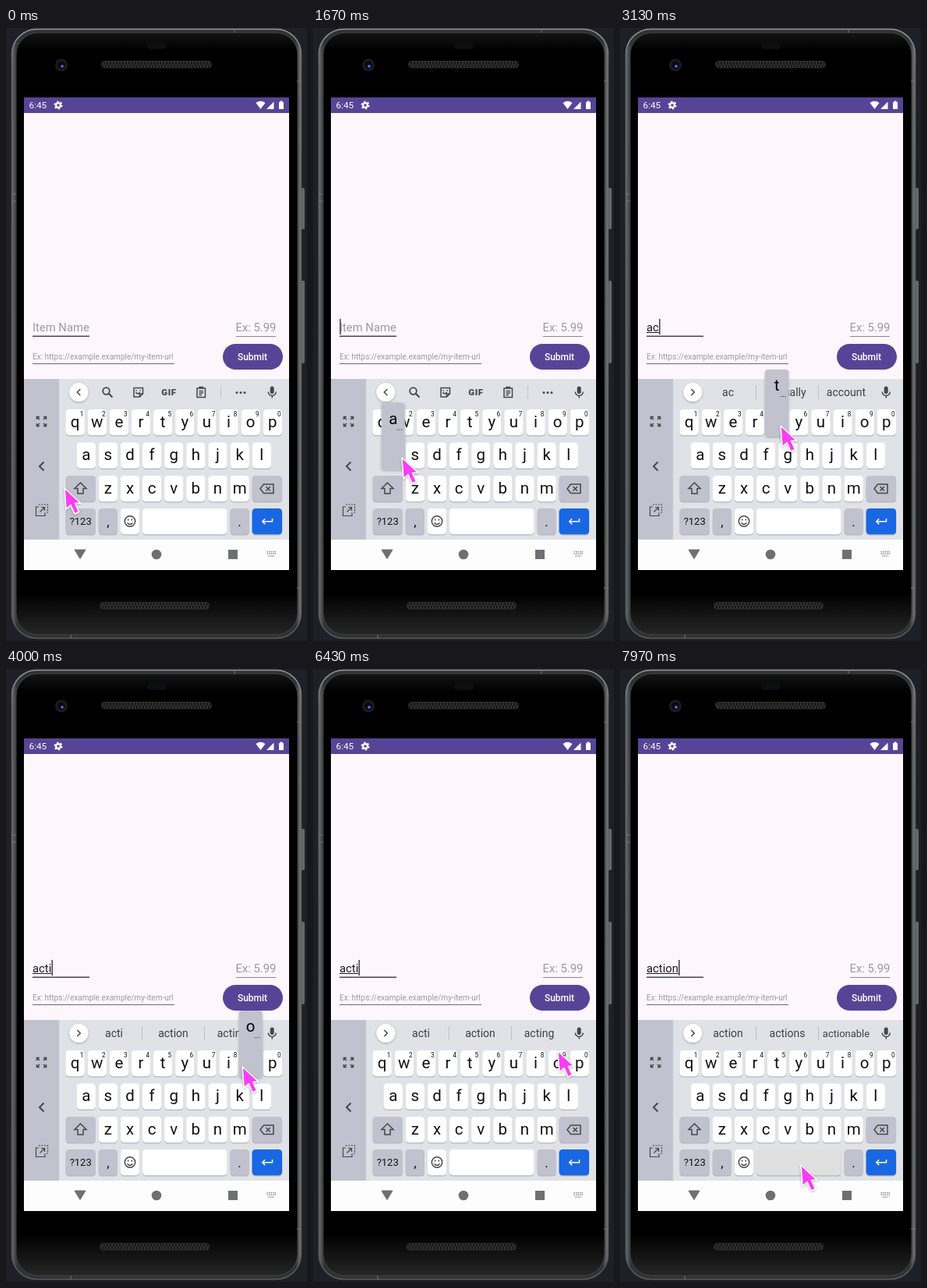
An HTML page that plays this animation: 386 px wide and 786 px high, repeating every 8 s.

```html
<!DOCTYPE html>
<html lang="en">
<head>
<meta charset="utf-8">
<title>Typing on a phone</title>
<style>
html, body { margin: 0; height: 100%; overflow: hidden; background: #1f2027; }
svg { display: block; width: 386px; height: 786px; font-family: Roboto, sans-serif; }
text { white-space: pre; }
.mid { text-anchor: middle; }
.line { fill: none; stroke: #46474b; stroke-width: 1.5; }
.hint { fill: #9d98a1; }
</style>
</head>
<body>
<svg viewBox="0 0 386 786">
  <defs>
    <linearGradient id="rim" x2="1" y2="0">
      <stop offset="0" stop-color="#6a6b6d"/><stop offset=".018" stop-color="#303132"/>
      <stop offset=".982" stop-color="#303132"/><stop offset="1" stop-color="#7c7d7f"/>
    </linearGradient>
    <linearGradient id="edge" x2="0" y2="1">
      <stop offset="0" stop-color="#98999b"/><stop offset=".06" stop-color="#626365"/>
      <stop offset="1" stop-color="#58595b"/>
    </linearGradient>
    <linearGradient id="glass" x2="0" y2="1">
      <stop offset="0" stop-color="#141414"/><stop offset=".03" stop-color="#000"/>
      <stop offset=".93" stop-color="#000"/><stop offset="1" stop-color="#262626"/>
    </linearGradient>
    <pattern id="mesh" width="4" height="9" patternUnits="userSpaceOnUse">
      <rect width="4" height="9" fill="#151515"/>
      <path d="M0 9 4 0M0 0 4 9" stroke="#3b3b3b" stroke-width=".9"/>
    </pattern>
    <filter id="soft" x="-30%" y="-30%" width="160%" height="160%">
      <feDropShadow dx="0" dy="1" stdDeviation="1.5" flood-opacity=".3"/>
    </filter>
  </defs>

  <!-- phone body -->
  <rect x="377" y="205" width="6" height="53" rx="2" fill="#66676a"/>
  <rect x="377" y="324" width="6" height="106" rx="2" fill="#66676a"/>
  <rect x="7.5" y="1.5" width="371" height="781" rx="32" fill="url(#rim)" stroke="url(#edge)" stroke-width="1.5"/>
  <rect x="13" y="6" width="361" height="772" rx="28" fill="url(#glass)" stroke="#424345"/>
  <path d="M7 213h6M7 222h6M373 68h6M373 718h6M293 1v5M83 778v5" stroke="#77787c"/>
  <rect x="181" y="18" width="25" height="9" rx="4.5" fill="#0d0d14"/>
  <circle cx="71" cy="47.5" r="8" fill="#1b1c20"/>
  <circle cx="71" cy="47.5" r="5" fill="#080a16"/>
  <circle cx="72" cy="49" r="1.8" fill="#5d78e4"/>
  <rect x="122.5" y="42.5" width="141" height="8.5" rx="4" fill="url(#mesh)" stroke="#2d2d2d"/>
  <rect x="120.5" y="736.5" width="140" height="8.5" rx="4" fill="url(#mesh)" stroke="#2d2d2d"/>

  <!-- app -->
  <rect x="23" y="89" width="340" height="606" fill="#fdf7fc"/>
  <rect x="23" y="89" width="340" height="20" fill="#574496"/>
  <g fill="#fff">
    <text x="29.5" y="103.3" font-size="11.8">6:45</text>
    <circle cx="67" cy="99" r="2.9" fill="none" stroke="#fff" stroke-width="2.2"/>
    <circle cx="67" cy="99" r="4.6" fill="none" stroke="#fff" stroke-width="1.8" stroke-dasharray="2.4"/>
    <path d="M320.5 96q6-4.500 12 0l-6 8zM334 104l9.500-9.500v9.500zM350 95h1.500v-1.500h3v1.500h1.500v9h-6z"/>
  </g>
  <text class="hint" id="hint" x="34" y="389" font-size="14.8">Item Name</text>
  <text class="hint" x="294.5" y="389" font-size="14.8">Ex: 5.99</text>
  <text class="hint" x="34" y="425" font-size="10">Ex: https://example.example/my-item-url</text>
  <path d="M34 395.3h73" stroke="#4b4360" stroke-width="1.5"/>
  <path d="M295 395.5h51" stroke="#8b868e"/>
  <path d="M34 430.5h182" stroke="#6e6973"/>
  <text id="typed" x="34" y="389" font-size="14.8" fill="#1d1b20"></text>
  <rect id="under" x="34" y="390" height="1" fill="#1d1b20"/>
  <rect id="caret" y="373" width="1.6" height="20" fill="#4b4360"/>
  <rect x="278" y="405" width="77" height="33" rx="16.5" fill="#574496"/>
  <text class="mid" x="316" y="426" font-size="12" font-weight="500" fill="#fff">Submit</text>

  <!-- keyboard -->
  <rect x="23" y="450" width="340" height="206" fill="#e1e2e8"/>
  <rect x="23" y="450" width="45" height="206" fill="#c1c2cd"/>
  <path d="M68 450v206" stroke="#d0d1d9"/>
  <rect x="23" y="656" width="340" height="39" fill="#fdfdfe"/>
  <g class="line">
    <path d="M43 502l-3.500-3.500M39.500 502v-3.500h3.500M48 502l3.500-3.500M48 498.500h3.500v3.500M43 507l-3.500 3.500M39.500 507v3.500h3.500M48 507l3.500 3.500M48 510.500h3.500v-3.500"/>
    <path d="M48.500 556.500l-5.500 5.500 5.500 5.500" stroke-width="2"/>
    <path d="M42 614h-3.500v11.500h11.500v-4M43.500 620.500l5.500-5.500M45 614.500h4.500v4.500" stroke-width="1.2"/>
    <path d="M42 611h11.500v10h-3" stroke-width="1.2" stroke-dasharray="2 1.500"/>
  </g>
  <circle cx="93.300" cy="467" r="12" fill="#fff" filter="url(#soft)"/>
  <path id="chevron" class="line"/>
  <g id="tools" class="line">
    <circle cx="128.5" cy="465.5" r="4.3" stroke-width="1.8"/><path d="M131.700 468.700l4.800 4.800" stroke-width="2"/>
    <path d="M164 461.500h11.500v7.500l-4 4h-7.500zM171.500 473v-4h4M166.500 467q2.500 4 5 0M167 464v1.500M172 464v1.500"/>
    <text class="mid" x="209" y="471.300" font-size="11.5" font-weight="900" letter-spacing=".6" fill="#46474b" stroke="none">GIF</text>
    <path d="M245 462h10.500v11.500h-10.500zM248 462v-1.500h4.500v1.500M247.500 465.500h5.500M247.500 468h5.500M247.500 470.500h3.500"/>
    <path d="M275.500 459v16" stroke="#c4c5cb" stroke-width="1"/>
    <path d="M296 467.500h.01M301 467.500h.01M306 467.500h.01" stroke-width="3" stroke-linecap="round"/>
  </g>
  <g id="words" class="mid" fill="#3f4043" font-size="14">
    <path d="M174.500 458v18M254.500 458v18" stroke="#bfc0c6"/>
    <text x="138.5" y="472"></text><text x="214.5" y="472"></text><text x="290" y="472"></text>
  </g>
  <rect x="338.700" y="459.500" width="5" height="9.500" rx="2.500" fill="#46474b"/>
  <path class="line" d="M336.300 466.500a5 5 0 0 0 10 0M341.300 471.500v3"/>
  <g id="keys"></g>
  <g class="line">
    <path d="M95.500 583l-7.500 7.500h4v6.500h7v-6.500h4z"/>
    <path d="M330.500 585h12.500v11.500h-12.500l-4.500-5.750zM333.500 588l5.500 5.500M339 588l-5.500 5.500"/>
    <circle cx="159" cy="632.5" r="6.700"/><path d="M155.500 634.500q3.500 4 7 0M156.700 629.500v2M161.300 629.500v2"/>
    <path d="M341.500 629v3.700h-12.500M332.200 629.300l-3.400 3.400 3.400 3.400" stroke="#fff"/>
  </g>
  <g fill="#6e6f72">
    <path d="M88 669h14l-7 11.500z" stroke="#6e6f72" stroke-linejoin="round"/>
    <circle cx="193" cy="675" r="6.300"/><rect x="285" y="669" width="12" height="12"/>
    <path d="M334.500 671.500h12M334.500 674h12M336.500 677h8" stroke="#8a8b8f" stroke-width="1.500" stroke-dasharray="1.500 1"/>
  </g>

  <g id="popup">
    <rect x="-15" width="30" height="86" rx="4" fill="#c1c2cd" filter="url(#soft)"/>
    <text class="mid" y="27" font-size="20.5"></text>
    <path d="M5 34.500h7" stroke="#333" stroke-dasharray="1.200 1.500"/>
  </g>
  <path id="pointer" d="M0 0 2 27 8 21.500 13 33 18.500 30.500 13.500 19.500 20.500 19z" fill="#fb3df4" stroke="#fff" stroke-width="1.5" stroke-linejoin="round" filter="url(#soft)"/>
</svg>
<script>
const $ = id => document.getElementById(id);
const LOOP = 8000;
const GREY = '#c1c2cd';
const keyAt = {};

function key(name, x, y, w, fill = '#fff') {
  keyAt[name] = { x: x + w / 2, y };
  return `<rect x="${x}" y="${y + 1}" width="${w}" height="33.5" rx="4.5" fill="#b4b5bc"/>
    <rect data-key="${name}" x="${x}" y="${y}" width="${w}" height="33.3" rx="4.5" fill="${fill}"/>`;
}
function label(s, x, y, size) {
  return `<text class="mid" x="${x}" y="${y}" font-size="${size}" fill="#111">${s}</text>`;
}
function letters(row, x, y) {
  return [...row].map((c, i) => {
    const left = x + i * 28.13;
    const digit = y < 500 ? label((i + 1) % 10, left + 20.7, y + 8.5, 8.3) : '';
    return key(c, left, y, 24.3) + label(c, left + 12.15, y + 22.5, 20.5) + digit;
  }).join('');
}
$('keys').innerHTML =
  letters('qwertyuiop', 76.5, 489) + letters('asdfghjkl', 90.6, 531.5) + letters('zxcvbnm', 118.7, 574) +
  key('shift', 76.5, 574, 38.5, GREY) + key('back', 315.6, 574, 38.5, GREY) +
  key('sym', 76.5, 616, 38.5, GREY) + label('?123', 95.7, 637, 13) +
  key('comma', 118.7, 616, 24.3, GREY) + label(',', 131, 639, 17) +
  key('emoji', 146.9, 616, 24.3) + key('space', 175, 616, 108.5) +
  key('dot', 287.5, 616, 24.3, GREY) + label('.', 299.6, 639, 17) +
  key('enter', 315.6, 616, 38.5, '#1967e2');

// Each press: start, release, key. The text changes on release.
const presses = [
  [1610, 1740, 'a'], [2400, 2640, 'c'], [3060, 3200, 't'], [3560, 3680, 'i'], [3920, 4080, 'o'],
  [5300, 5390, 'back'], [6650, 6760, 'o'], [7440, 7530, 'n'], [7920, 8000, 'space']
];
const FOCUS = 620;
const suggestions = {
  a: ['a', 'and', 'at'], ac: ['ac', 'actually', 'account'], act: ['act', 'action', 'actually'],
  acti: ['acti', 'action', 'acting'], actio: ['actio', 'action', 'actions'],
  action: ['action', 'actions', 'actionable']
};
// Pointer stops: time, x, y
const path = [
  [0, 75, 590], [60, 75, 590], [560, 78, 384], [880, 78, 384], [1560, 114, 551], [1780, 114, 551],
  [2330, 188, 593], [2650, 188, 593], [3020, 206, 510], [3230, 206, 510], [3530, 286, 509],
  [3690, 286, 509], [3880, 303, 510], [4400, 304, 510], [4850, 342, 614], [5100, 338, 592],
  [5800, 338, 592], [6430, 314, 490], [6620, 312, 506], [6800, 312, 506], [7370, 271, 590],
  [7560, 271, 590], [7910, 232, 636], [8000, 232, 636]
];

function pointerAt(t) {
  const i = path.findIndex(p => p[0] > t);
  const [a, b] = [path[i - 1], path[i]];
  const u = (t - a[0]) / (b[0] - a[0]), e = u * u * (3 - 2 * u);
  return [1, 2].map(k => a[k] + (b[k] - a[k]) * e);
}
const show = (el, on) => el.style.display = on ? '' : 'none';

function draw(t) {
  let text = '', since = FOCUS, held = null;
  for (const [start, end, name] of presses) {
    if (t >= end) {
      text = name === 'back' ? text.slice(0, -1) : text + name;
      since = end;
    } else if (t >= start) held = name;
  }

  $('typed').textContent = text;
  const width = text ? $('typed').getComputedTextLength() : 0;
  $('under').setAttribute('width', width);
  $('caret').setAttribute('x', 34.2 + width);
  show($('caret'), t >= FOCUS && (t - since) % 1000 < 500);
  show($('hint'), !text);
  show($('tools'), !text);
  show($('words'), text);
  $('chevron').setAttribute('d', text ? 'M91.3 463l4 4-4 4' : 'M95.3 463l-4 4 4 4');
  $('words').querySelectorAll('text').forEach((el, i) => {
    const word = text ? suggestions[text][i] : '';
    el.textContent = word;
    el.setAttribute('font-size', word.length > 9 ? 13 : 14);
    el.setAttribute('font-weight', text === 'actio' && i === 1 ? 700 : 400);
  });

  const isLetter = held && held.length === 1;
  show($('popup'), isLetter);
  if (isLetter) {
    const { x, y } = keyAt[held];
    $('popup').setAttribute('transform', `translate(${x} ${y - 51})`);
    $('popup').querySelector('text').textContent = held;
  }
  for (const name of ['back', 'space'])
    document.querySelector(`[data-key=${name}]`).style.filter = held === name ? 'brightness(.88)' : '';
  $('pointer').setAttribute('transform', `translate(${pointerAt(t)})`);
}

function tick() {
  draw(performance.now() % LOOP);
  requestAnimationFrame(tick);
}
tick();
</script>
</body>
</html>
```
